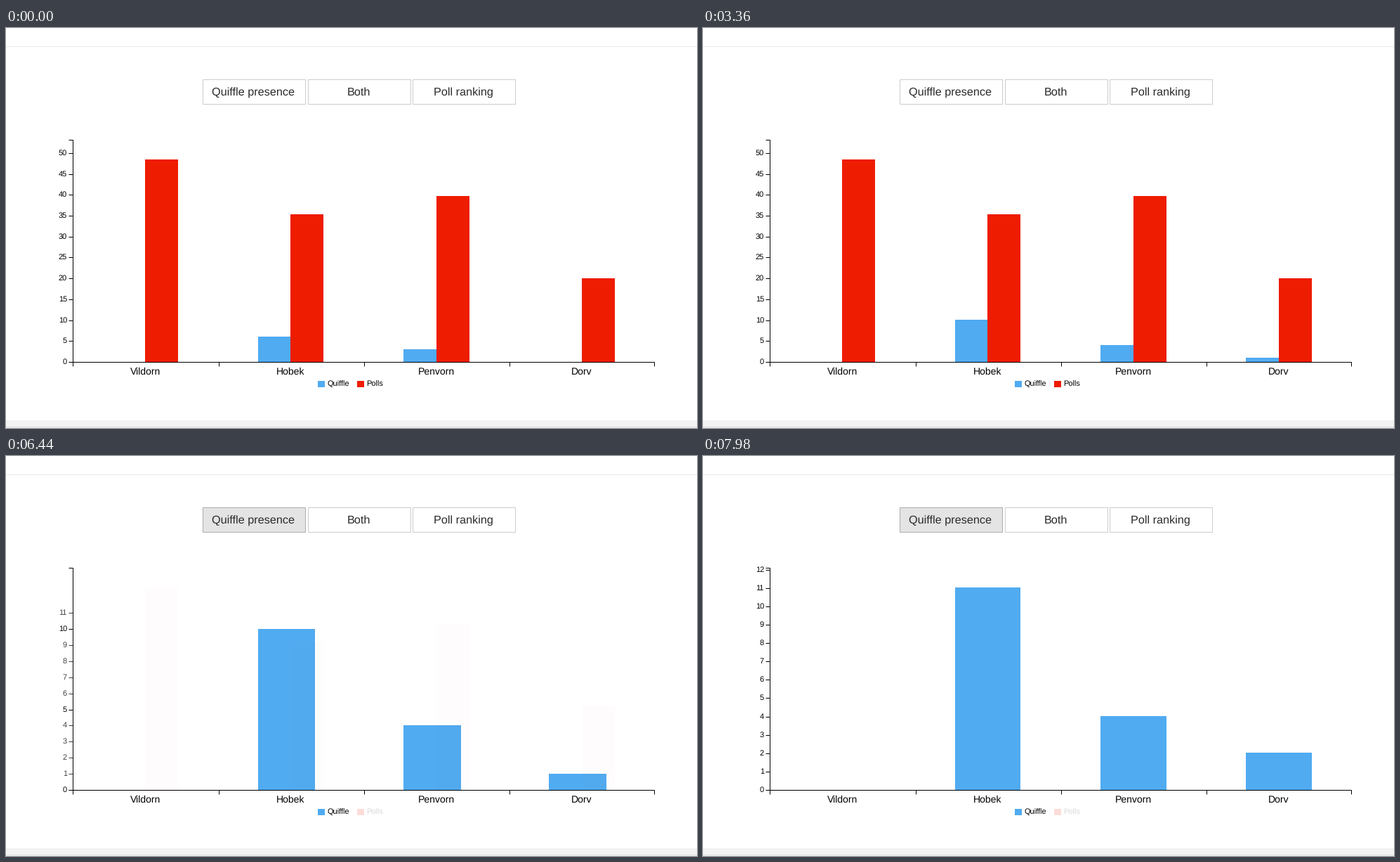
A matplotlib script for the animation above (8 s loop, 984 px wide and 569 px high).

```python
import math

import matplotlib.pyplot as plt
from matplotlib.animation import FuncAnimation
from matplotlib.patches import Rectangle

W, H, DPI = 984, 569, 64
LOOP, INTERVAL, STEP = 8000, 20, 70

BLUE, RED = "#50abf1", "#ee1c00"
NAMES = ["Vildorn", "Hobek", "Penvorn", "Dorv"]
POLLS = [48.36, 35.2, 39.7, 20]

LEFT, TOP, BASE = 94.5, 158.5, 474.5
BAND, HALF = 207.2, 46.8
CENTERS = [94.7 + BAND * (i + 0.5) for i in range(4)]

# pixels per unit for domains that reach 1.1 times the highest value
SPAN = BASE - TOP
UNIT_ALL, UNIT_TEN, UNIT_ELEVEN = (SPAN / (1.1 * m) for m in (48.36, 10, 11))


def run(first, last):
    return list(range(first, last + 1, STEP))


# moments at which the screen is refreshed; it stands still in between
REFRESH = ([0] + run(280, 630) + [770] + run(1400, 1470) + run(1610, 1750)
           + [1960] + run(3220, 3360) + [5950] + run(6230, 6440) + [6720]
           + run(6860, 6930) + run(7070, 7140) + [7350] + run(7560, 7770)
           + [7980])
FILTER_AT = 6230

plt.rcParams["font.family"] = "Liberation Sans"
plt.rcParams["text.hinting"] = "none"
plt.rcParams["toolbar"] = "None"

fig = plt.figure(figsize=(W / DPI, H / DPI), dpi=DPI, facecolor="white")
ax = fig.add_axes([0, 0, 1, 1])
ax.set_xlim(0, W)
ax.set_ylim(H, 0)
ax.axis("off")


def pt(px):
    return px * 72 / DPI


def rect(x, y, w, h, color, **kw):
    kw.setdefault("lw", 0)
    return ax.add_patch(Rectangle((x, y), w, h, fc=color, **kw))


def line(xs, ys, color="black", z=4):
    return ax.plot(xs, ys, color=color, lw=pt(1), zorder=z,
                   solid_capstyle="butt", solid_joinstyle="miter")[0]


def label(x, y, text, px, ha="center", color="black"):
    return ax.text(x, y, text, fontsize=pt(px), ha=ha, va="baseline",
                   color=color, zorder=5)


def clamp(v):
    return min(1, max(0, v))


def ease(t, start, length):
    """Cubic in-out progress."""
    u = clamp((t - start) / length)
    return 4 * u ** 3 if u < 0.5 else 1 - 4 * (1 - u) ** 3


def mix(a, b, p):
    return a + (b - a) * p


# page
line([0, W], [25.5, 25.5], "#e9e9e9")
rect(0, 558, W, 11, "#f3f3f3")
line([0, W], [566.5, 566.5], "#dddddd")

# buttons
buttons = []
for x, text in [(279, "Quiffle presence"), (429, "Both"), (578.5, "Poll ranking")]:
    x = math.floor(x) + 0.5
    buttons.append(rect(x, 72.5, 146, 35, "white", ec="#cccccc", lw=pt(1)))
    label(x + 73, 96, text, 16.2, color="#2b2b2b")

# bars
blue_bars = [rect(c - HALF, BASE, HALF, 0, BLUE, zorder=2) for c in CENTERS]
red_bars = [rect(c, BASE - v * UNIT_ALL, HALF, v * UNIT_ALL, RED, zorder=2)
            for c, v in zip(CENTERS, POLLS)]

# axes
line([89, LEFT, LEFT, 89], [TOP, TOP, BASE, BASE])
line([LEFT, LEFT, 922.5, 922.5], [480.5, BASE, BASE, 480.5])
for x in (302.5, 509.5, 716.5):
    line([x, x], [BASE, 480.5])
for c, name in zip(CENTERS, NAMES):
    label(c, 493, name, 14)
ticks = [(line([89, LEFT], [BASE, BASE]), label(87, BASE, "", 11, "right"))
         for _ in range(13)]

# legend
rect(444, 502, 10, 9, BLUE)
label(457, 510, "Quiffle", 11, "left")
polls_key = [rect(500, 502, 10, 9, RED), label(513, 510, "Polls", 11, "left")]


def place_tick(i, value, unit, alpha):
    mark, text = ticks[i]
    y = math.floor(BASE - value * unit) + 0.5
    shown = alpha > 0.01 and y >= TOP - 0.5
    mark.set_visible(shown)
    text.set_visible(shown)
    if shown:
        mark.set_ydata([y, y])
        mark.set_alpha(alpha)
        text.set_text(str(value))
        text.set_y(y + 3.5)
        text.set_alpha(alpha)


def draw_ticks(t, grow):
    shrink = ease(t, 6555, 350)
    unit = mix(mix(UNIT_ALL, UNIT_TEN, grow), UNIT_ELEVEN, shrink)
    for i in range(13):
        if t < FILTER_AT:
            place_tick(i, i * 5, UNIT_ALL, 1 if i <= 10 else 0)
        elif i == 12:
            place_tick(i, i, unit, shrink)
        else:
            place_tick(i, i, unit, 1 if i % 5 == 0 else grow)


def bar_heights(t, grow):
    first = ease(t, 190, 600)
    second = ease(t, 1155, 900)
    counts = [0, 6 + 3 * first + second, 3 + first, ease(t, 3140, 280)]
    unit = mix(UNIT_ALL, UNIT_TEN, grow)
    heights = [n * unit for n in counts]
    settle = ease(t, 6830, 350)
    last = 1 + ease(t, 7330, 500)
    final = [n * UNIT_ELEVEN for n in (0, 11, 4, last)]
    return [mix(a, b, settle) for a, b in zip(heights, final)]


def update(frame):
    now = frame * INTERVAL + INTERVAL / 2
    t = max(r for r in REFRESH if r <= now)
    filtered = t >= FILTER_AT
    grow = ease(t, FILTER_AT, 350)

    hover = clamp((t - 6160) / 140)
    buttons[0].set_facecolor(str(mix(1, 0.894, hover)))
    buttons[0].set_edgecolor(str(mix(0.8, 0.68, hover)))

    for bar, h in zip(blue_bars, bar_heights(t, grow)):
        bar.set_y(BASE - h)
        bar.set_height(h)
        bar.set_width(HALF * (1 + grow))
    for bar in red_bars:
        bar.set_alpha(0.045 * (1 - grow) if filtered else 1)
    for part in polls_key:
        part.set_alpha(0.15 if filtered else 1)
    draw_ticks(t, grow)
    return []


anim = FuncAnimation(fig, update, frames=LOOP // INTERVAL, interval=INTERVAL,
                     init_func=lambda: update(0), repeat=True, repeat_delay=0,
                     blit=False)
plt.show()
```
